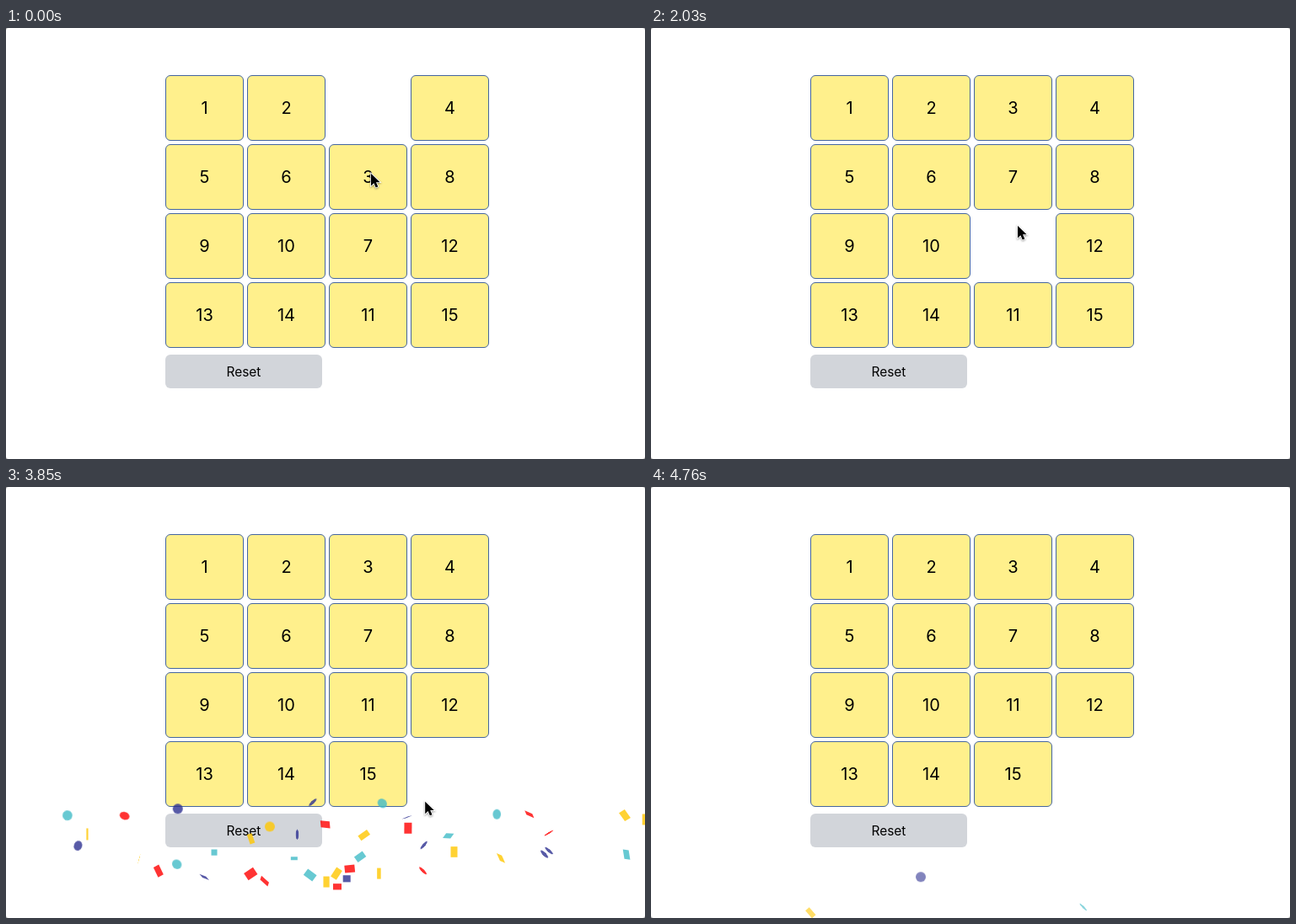
Write an HTML page that moves like this. It is 758x512 px and loops after 4.83 s.

```html
<!DOCTYPE html>
<html lang="en">
<head>
<meta charset="utf-8">
<title>Sliding puzzle</title>
<style>
html, body { margin: 0; width: 100%; height: 100%; overflow: hidden; background: #999; }
#stage {
  position: relative; width: 758px; height: 512px; overflow: hidden;
  background: #fff; border-radius: 3px; color: #000; font-family: Inter, sans-serif;
}
#stage div, #cursor { position: absolute; }
.tile, #reset {
  box-sizing: border-box; display: flex; align-items: center; justify-content: center; border-radius: 6px;
}
.tile { width: 93px; height: 78px; background: #fff08c; border: 1px solid #44659f; font-size: 20px; }
#reset { left: 189px; top: 388px; width: 186px; height: 40px; background: #d2d5da; font-size: 15.4px; }
#confetti { left: 387.5px; top: 388px; }
#cursor { left: 0; top: 0; overflow: visible; filter: drop-shadow(0 1px 1px #0006); }
</style>
</head>
<body>
<div id="stage">
  <div id="reset">Reset</div>
  <div id="confetti"></div>
  <svg id="cursor" width="14" height="20">
    <path d="M0 0v14.5l3.4-3.2 2.3 5.2 2.6-1.1-2.3-5.1h4.6z" stroke="#fff" stroke-width="1.6" paint-order="stroke"/>
  </svg>
</div>
<script>
const LOOP = 4830, STEP = 70;
const stage = document.getElementById('stage');
const confetti = document.getElementById('confetti');
const cursor = document.getElementById('cursor');

const startBoard = [1, 2, 0, 4, 5, 6, 3, 8, 9, 10, 7, 12, 13, 14, 11, 15];
const moves = [
  { at: 1190, tile: 3, cell: 2 },
  { at: 1960, tile: 7, cell: 6 },
  { at: 2590, tile: 11, cell: 10 },
  { at: 3430, tile: 15, cell: 14 },
];
// time, x, y of the pointer tip
const pointerPath = [
  [0, 433, 173], [1470, 433, 173], [1680, 435, 235], [2170, 435, 235], [2450, 439, 337],
  [2870, 439, 337], [3150, 522.5, 342.5], [3640, 522.5, 342.5], [4200, 455, 426], [4480, 440, 530],
];

const BURST_AT = 3430, BURST_LEAD = 25, COUNT = 50, REACH = 800, FALL = 512;
const colors = ['#ffc700', '#ff0000', '#2e3191', '#41bbc7'];
const axes = ['1,1,0', '1,0,1', '0,1,1', '1,0,0', '0,1,0', '0,0,1'];

const clamp = v => Math.min(1, Math.max(0, v));
const curve = (s, a, b) => 3 * (1 - s) ** 2 * s * a + 3 * (1 - s) * s * s * b + s ** 3;

function bezier(t, x1, y1, x2, y2) {
  let low = 0, high = 1;
  for (let i = 0; i < 18; i++) {
    const mid = (low + high) / 2;
    if (curve(mid, x1, x2) < t) low = mid; else high = mid;
  }
  return curve(low, y1, y2);
}

function seeded(seed) {
  return () => {
    seed = (seed + 0x6d2b79f5) | 0;
    let v = Math.imul(seed ^ (seed >>> 15), 1 | seed);
    v = (v + Math.imul(v ^ (v >>> 7), 61 | v)) ^ v;
    return ((v ^ (v >>> 14)) >>> 0) / 4294967296;
  };
}

function addDiv(parent, className = '') {
  const el = document.createElement('div');
  el.className = className;
  return parent.appendChild(el);
}

const tiles = startBoard.flatMap((number, cell) => {
  if (!number) return [];
  const el = addDiv(stage, 'tile');
  el.textContent = number;
  stage.insertBefore(el, confetti);
  return [{ el, number, cell }];
});

const random = seeded(21);
const particles = Array.from({ length: COUNT }, (_, i) => {
  const degree = i * 360 / COUNT;
  const spread = 1 - Math.abs((degree + 90) % 360 - 180) / 90;
  const round = random() < 0.36;
  const el = addDiv(confetti);
  Object.assign(el.style, {
    width: (round ? 12 : 6 + Math.round(random() * 4)) + 'px',
    height: (round ? 12 : 12 + Math.round(random() * 2)) + 'px',
    borderRadius: round ? '50%' : 0,
    background: colors[i % 4],
  });
  return {
    el,
    side: -spread,
    duration: 2150 + random() * 850,
    ease: random() * 0.5,
    lift: -0.15 + random() * 0.47,
    glide: Math.max(0, 0.3 * (1 - Math.abs(degree - 180) / 90)),
    axis: axes[Math.floor(random() * (round ? 5 : 6))],
    turn: 200 + random() * 600,
  };
});

function drawTiles(time) {
  for (const { el, number, cell } of tiles) {
    const move = moves.find(m => m.tile === number && time >= m.at);
    const place = move ? move.cell : cell;
    el.style.left = 189 + 97 * (place % 4) + 'px';
    el.style.top = 56 + 82 * Math.floor(place / 4) + 'px';
  }
}

function drawPointer(time) {
  const next = pointerPath.findIndex(p => p[0] > time);
  const to = pointerPath.at(next);
  const from = next < 0 ? to : pointerPath[next - 1];
  const k = clamp((time - from[0]) / (to[0] - from[0] || 1));
  const at = i => from[i] + (to[i] - from[i]) * k;
  cursor.style.transform = `translate(${at(1)}px, ${at(2)}px)`;
}

function drawConfetti(time) {
  confetti.style.display = time < BURST_AT ? 'none' : 'block';
  const age = time - BURST_AT + BURST_LEAD;
  if (age < 0) return;
  const opacity = 1 - 0.4 * clamp((time - 3600) / 500);
  for (const p of particles) {
    const t = clamp(age / p.duration);
    const x = REACH * p.side * bezier(t, 0, 0, 0, Math.abs(p.side));
    const y = FALL * bezier(t, p.ease, p.lift, 0.5, p.glide);
    p.el.style.transform = `translate(${x}px, ${y}px) rotate3d(${p.axis}, ${age / p.turn}turn)`;
    p.el.style.opacity = opacity;
  }
}

function draw(now) {
  const time = Math.floor(now % LOOP / STEP) * STEP;
  drawTiles(time);
  drawPointer(time);
  drawConfetti(time);
}

const start = performance.now();
function tick() {
  draw(performance.now() - start);
  requestAnimationFrame(tick);
}
tick();
</script>
</body>
</html>
```
